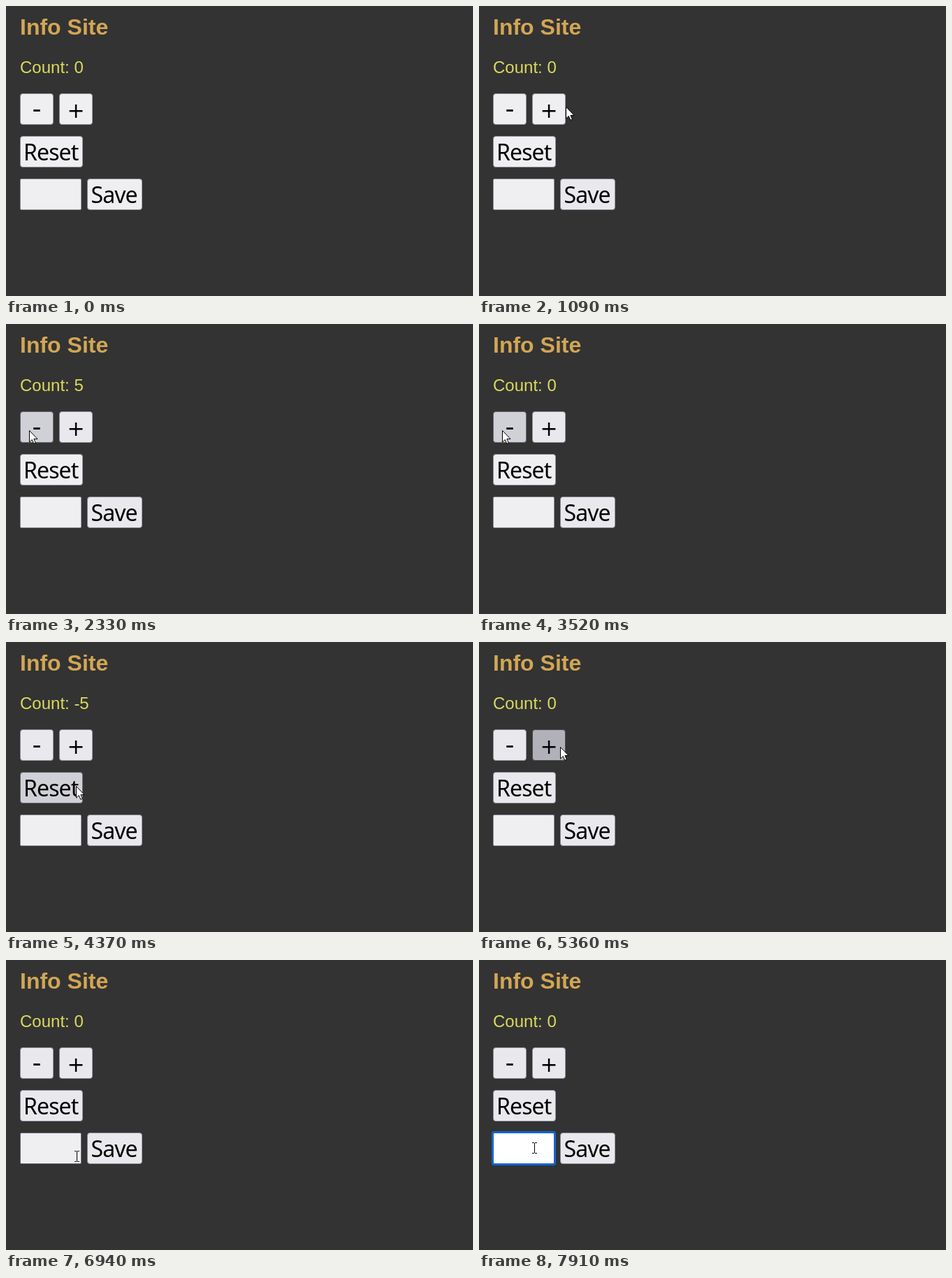
An HTML page with a canvas that plays this animation: 668 px wide and 415 px high, repeating every 8 s.

```html
<!DOCTYPE html>
<html lang="en">
<head>
<meta charset="utf-8">
<title>Info Site</title>
<style>
  html, body { margin: 0; width: 100%; height: 100%; overflow: hidden; background: #333; }
  canvas { display: block; }
</style>
</head>
<body>
<canvas id="stage" width="668" height="415"></canvas>
<script>
const ctx = document.getElementById('stage').getContext('2d');
const LOOP = 8000;
const STEP = 132; // the pointer advances once per step
const FOCUS = 7220;
const BOX_H = 45;
const UI_FONT = '"Noto Sans", sans-serif';
const SIGN_FONT = '"DejaVu Sans", sans-serif';
const PAGE_FONT = '"Liberation Sans", Arial, sans-serif';

const PALE = { fill: '#efeff1', border: '#8f8f9d' };
const NORMAL = { fill: '#e9e9ed', border: '#8f8f9d' };
const HOVER = { fill: '#d0d0d7', border: '#676774' };
const ACTIVE = { fill: '#b1b1b9', border: '#484851' };

// used: when the pointer first reaches a button, which stays a little darker afterwards
const buttons = [
  { x: 20, y: 125, w: 48, used: 2330 },
  { x: 76, y: 125, w: 48, used: 1240 },
  { x: 20, y: 186, w: 90, used: 4370 },
  { x: 116, y: 247, w: 79, used: 820 }
];
const input = { x: 20, y: 247, w: 88 };

const entry = { x: 262, y: 460 };
const moves = [
  { start: 430, steps: 6, x: 124, y: 144 },
  { start: 1240, steps: 1, x: 115, y: 150 },
  { start: 2190, steps: 2, x: 33, y: 152 },
  { start: 4370, steps: 1, x: 100, y: 206 },
  { start: 4490, steps: 2, x: 88, y: 212 },
  { start: 4920, steps: 3, x: 116, y: 150 },
  { start: 5950, steps: 2, x: 80, y: 214 },
  { start: 6808, steps: 2, x: 101, y: 281 },
  { start: 7778, steps: 2, x: 79, y: 269 }
];

// runs of clicks; one without an amount resets the counter
const bursts = [
  { start: 1530, gap: 132, clicks: 5, amount: 1 },
  { start: 2730, gap: 151, clicks: 10, amount: -1 },
  { start: 4640, gap: 150, clicks: 1 },
  { start: 5360, gap: 147, clicks: 3, amount: 1 },
  { start: 6370, gap: 150, clicks: 1 }
];

function pointerAt(t) {
  let at = entry;
  for (const { start, steps, x, y } of moves) {
    if (t < start) break;
    const p = Math.min(1, (Math.floor((t - start) / STEP) + 1) / steps);
    at = { x: at.x + (x - at.x) * p, y: at.y + (y - at.y) * p };
  }
  return { x: Math.round(at.x), y: Math.round(at.y) };
}

function clickState(t) {
  let count = 0, pressed = false;
  for (const { start, gap, clicks, amount } of bursts) {
    if (t < start) break;
    const done = Math.min(clicks, Math.floor((t - start) / gap));
    if (amount) count += amount * done;
    else if (done) count = 0;
    pressed = done < clicks && done % 2 === 0;
  }
  return { count, pressed };
}

const inside = (p, b) =>
  p.x >= b.x && p.x < b.x + b.w && p.y >= b.y && p.y < b.y + BOX_H;

function text(str, x, y, font, color = '#000', spacing = 0) {
  ctx.font = font;
  ctx.fillStyle = color;
  ctx.letterSpacing = spacing + 'px';
  ctx.fillText(str, x, y);
}

function drawBox({ x, y, w }, radius, { fill, border }) {
  ctx.beginPath();
  ctx.roundRect(x + 0.5, y + 0.5, w - 1, BOX_H - 1, radius);
  ctx.fillStyle = fill;
  ctx.fill();
  ctx.strokeStyle = border;
  ctx.lineWidth = 1;
  ctx.stroke();
}

function drawButton(b, t, at, pressed) {
  const idle = t < b.used ? PALE : NORMAL;
  drawBox(b, 3.5, inside(at, b) ? (pressed ? ACTIVE : HOVER) : idle);
}

function drawInput(t, over) {
  const focused = t >= FOCUS;
  const fill = focused ? '#fff' : PALE.fill;
  drawBox(input, 1.5, { fill, border: over ? HOVER.border : PALE.border });
  if (!focused) return;
  // the ring closes in on the field
  const spread = 0.5 + Math.max(0, 2 - Math.floor((t - FOCUS) / STEP));
  ctx.beginPath();
  ctx.roundRect(input.x - spread, input.y - spread,
    input.w + 2 * spread, BOX_H + 2 * spread, 2);
  ctx.lineWidth = 3;
  ctx.strokeStyle = '#1264d2';
  ctx.stroke();
}

function drawArrow({ x, y }) {
  const shape = [[0, 0], [0, 16.5], [3.8, 13], [6.3, 18.8], [8.9, 17.7], [6.4, 12], [11.5, 12]];
  ctx.beginPath();
  shape.forEach(([dx, dy]) => ctx.lineTo(x + 0.5 + dx, y + 0.5 + dy));
  ctx.closePath();
  ctx.fillStyle = '#fff';
  ctx.fill();
  ctx.strokeStyle = '#000';
  ctx.lineWidth = 1;
  ctx.stroke();
}

function drawBeam({ x, y }) {
  ctx.fillStyle = '#000';
  ctx.fillRect(x, y - 7, 1, 14);
  for (const edge of [y - 8, y + 7]) {
    ctx.fillRect(x - 3, edge, 3, 1);
    ctx.fillRect(x + 1, edge, 3, 1);
  }
}

function draw(t) {
  const at = pointerAt(t);
  const { count, pressed } = clickState(t);
  const overInput = inside(at, input);

  ctx.fillStyle = '#333';
  ctx.fillRect(0, 0, 668, 415);
  ctx.textAlign = 'left';
  text('Info Site', 20, 41, 'bold 32px ' + PAGE_FONT, '#d2a654');
  text('Count: ' + count, 20, 96, '24px ' + PAGE_FONT, '#dada5e');

  buttons.forEach(b => drawButton(b, t, at, pressed));
  drawInput(t, overInput);

  text('Reset', 25, 221, '32px ' + UI_FONT, '#000', -0.9);
  text('Save', 121.5, 282, '32px ' + UI_FONT, '#000', -0.9);
  ctx.textAlign = 'center';
  text('-', 44, 159, '36px ' + SIGN_FONT);
  text('+', 100, 160, '30px ' + SIGN_FONT);

  if (t >= moves[0].start) (overInput ? drawBeam : drawArrow)(at);
}

const start = performance.now();
function tick() {
  draw((performance.now() - start) % LOOP);
  requestAnimationFrame(tick);
}
tick();
</script>
</body>
</html>
```
